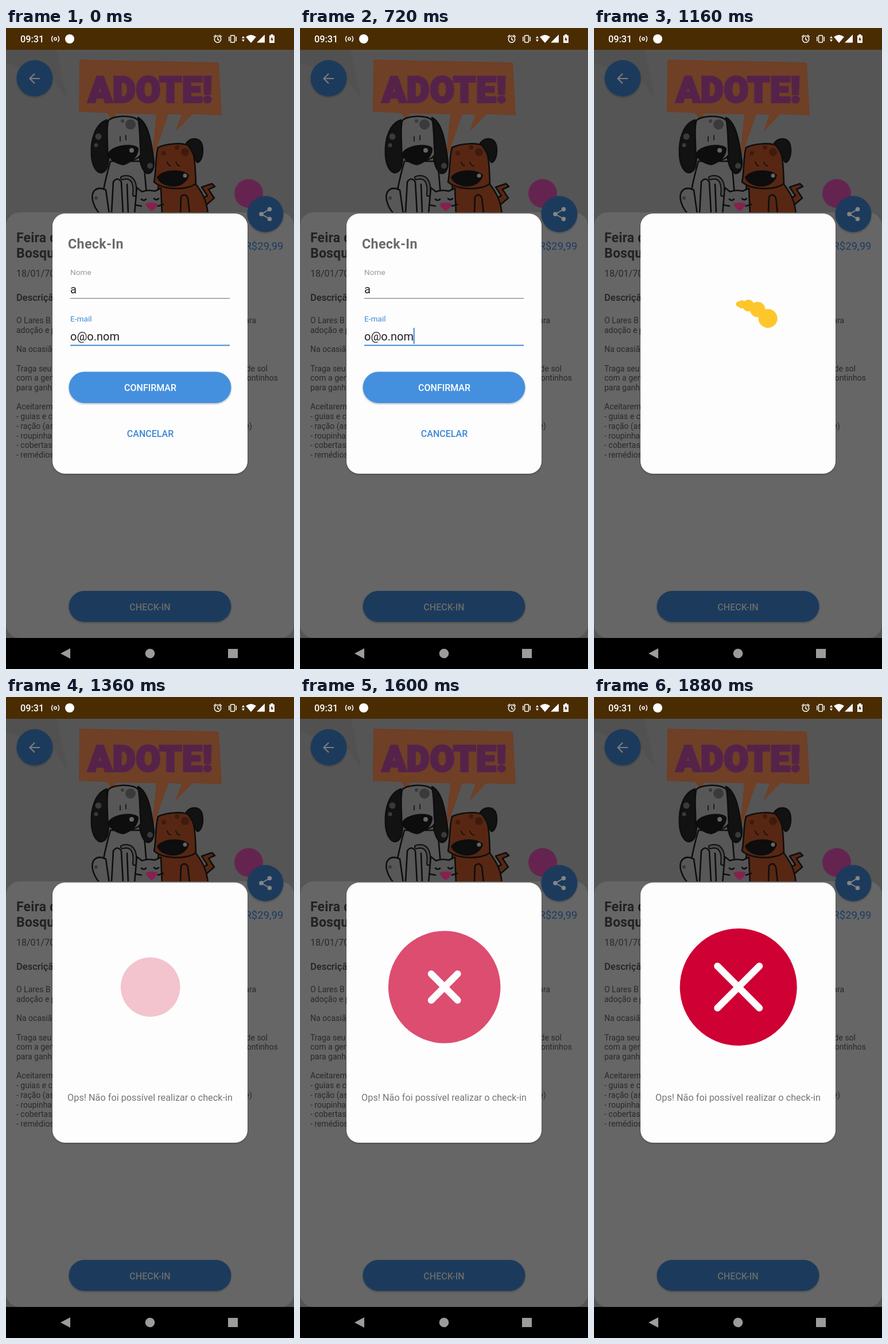
These frames come from a looping animation (502 px wide and 1116 px high, 3.2 s). An HTML page:

```html
<!DOCTYPE html>
<html lang="pt">
<head>
<meta charset="utf-8">
<title>Check-In</title>
<style>
  html, body { margin: 0; width: 100%; height: 100%; overflow: hidden; background: #000; }
  svg { display: block; width: 100%; height: 100%; font-family: Roboto, "Noto Sans", sans-serif; }
  .mid { text-anchor: middle; font-weight: 500; font-size: 16px; }
  .ink { stroke: #0e0e0e; stroke-width: 2.6; stroke-linejoin: round; stroke-linecap: round; }
  .line { fill: none; }
  .body { font-size: 14px; fill: #292929; }
</style>
</head>
<body>
<svg viewBox="0 0 502 1116">
  <defs>
    <filter id="soft" x="-20%" y="-20%" width="140%" height="150%">
      <feDropShadow dx="0" dy="1.5" stdDeviation="1.5" flood-opacity=".28"/>
    </filter>
    <clipPath id="photo"><rect y="38" width="502" height="284"/></clipPath>
  </defs>

  <!-- page -->
  <rect width="502" height="1062" fill="#555"/>
  <path d="M0 38H88L107 125L82 90L0 60Z" fill="#515151"/>

  <g clip-path="url(#photo)">
    <path d="M128 55L371 60L376 152L325 150L295 181L306 151L283 150L253 236L262 150L190 149L192 169L176 148L127 146Z" fill="#6f3f26"/>
    <text x="252" y="129" text-anchor="middle" font-size="61" font-weight="900" letter-spacing="1.2" fill="#552349" stroke="#552349" stroke-width="4">ADOTE!</text>

    <!-- white dog -->
    <g class="ink" fill="#575757">
      <path d="M182 232C174 260 167 290 164 324H248L240 232Z"/>
      <path d="M174 282C158 274 148 284 151 300C154 312 158 318 164 324H180Z"/>
      <path d="M176 160C158 166 147 190 149 222C150 240 158 252 166 252C176 250 178 240 179 224Z" fill="#121212"/>
      <path d="M230 156C246 164 252 190 257 226C260 244 254 254 246 253C238 250 234 236 231 216Z" fill="#121212"/>
      <path d="M178 162C184 152 224 150 231 162C234 180 233 196 235 220C228 236 184 236 177 220C178 200 174 180 178 162Z"/>
      <path class="line" d="M184 322L187 268Q194 258 201 268L204 322M213 322L211 272"/>
      <path class="line" d="M199 189V197M209 187V195" stroke-width="1.6"/>
    </g>
    <path d="M177 219C184 203 222 199 231 209C232 226 214 237 204 239C192 237 179 229 177 219Z" fill="#0d0d0d"/>
    <g fill="#3a3a3a">
      <circle cx="217" cy="168" r="9"/><circle cx="203" cy="162" r="3"/>
      <circle cx="161" cy="189" r="5.5"/><circle cx="157" cy="204" r="3.5"/>
      <circle cx="251" cy="240" r="5"/><circle cx="157" cy="296" r="3"/>
    </g>
    <circle cx="219" cy="213" r="4" fill="#666"/>

    <!-- brown dog -->
    <g class="ink" fill="#572713">
      <path d="M328 304L351 292L341 277L359 271L364 276L353 281L363 296L334 321Z"/>
      <path d="M266 270L262 324H352C350 300 342 286 328 268Z"/>
      <path d="M265 208C280 201 310 198 323 207C330 224 330 250 331 270C322 282 276 284 258 268C262 250 260 224 265 208Z"/>
      <path d="M314 201C322 190 338 190 342 204C345 220 340 232 334 234C328 230 328 214 314 201Z" fill="#121212"/>
      <path class="line" d="M304 322L305 294Q312 286 317 296L320 322"/>
      <path class="line" d="M281 233Q283 240 287 240M296 233Q299 241 303 240" stroke-width="1.6"/>
    </g>
    <path d="M263 260C272 245 308 244 319 256C316 270 302 277 289 276C276 275 266 269 263 260Z" fill="#0d0d0d"/>
    <circle cx="312" cy="257" r="3.5" fill="#666"/>
    <g fill="#401b0d">
      <circle cx="312" cy="216" r="7"/><circle cx="298" cy="208" r="4"/><circle cx="275" cy="218" r="4"/>
    </g>

    <!-- cat -->
    <path d="M203 261C222 256 226 272 224 290" fill="none" stroke="#0e0e0e" stroke-width="8" stroke-linecap="round"/>
    <path d="M203 261C222 256 226 272 224 290" fill="none" stroke="#4b4b4b" stroke-width="4" stroke-linecap="round"/>
    <path class="ink" d="M224 324L228 278L237 285Q248 281 259 284L270 279L272 324Z" fill="#555" stroke-width="2"/>
    <path class="line ink" d="M236 298Q240 302 244 298M258 297Q262 301 266 297M225 308L236 310M274 307L265 310" stroke-width="1.4"/>
    <path d="M243 306Q254 302 265 306Q262 314 254 319Q246 314 243 306Z" fill="#87204f"/>

    <circle cx="423" cy="288" r="25" fill="#652450"/>
  </g>

  <rect y="321" width="502" height="741" rx="24" fill="#666"/>
  <g filter="url(#soft)" fill="#1b3a5b">
    <circle cx="50" cy="87.5" r="31.5"/>
    <circle cx="452" cy="324" r="31.5"/>
    <rect x="109.5" y="980" width="283" height="54" rx="27"/>
  </g>
  <path d="M59 88H42M50 79.5L41.5 88L50 96.5" fill="none" stroke="#7c7c7c" stroke-width="2.2"/>
  <g fill="#858585" stroke="#858585" stroke-width="2">
    <path d="M459 316L445 324L459 332" fill="none"/>
    <circle cx="459.5" cy="315.5" r="2.8"/><circle cx="445" cy="324" r="2.8"/><circle cx="459.5" cy="332.5" r="2.8"/>
  </g>
  <text class="mid" x="251" y="1013.5" fill="#6b6b6b">CHECK-IN</text>

  <g fill="#222">
    <g font-size="23" font-weight="700" letter-spacing=".2"><text x="18" y="373">Feira de</text><text x="18" y="400">Bosque</text></g>
    <text x="18" y="433" font-size="16" fill="#292929">18/01/70</text>
    <text x="18" y="475" font-size="16.5" font-weight="500">Descrição</text>
  </g>
  <text x="483.5" y="386" font-size="18.5" text-anchor="end" fill="#1c3c62">R$29,99</text>
  <g id="copy" class="body"></g>

  <!-- system bars -->
  <rect width="502" height="38" fill="#4a2c03"/>
  <text x="25" y="25" font-size="16.3" font-weight="500" fill="#fff">09:31</text>
  <g fill="none" stroke="#fff" stroke-width="1.5">
    <circle cx="86" cy="19" r="2.2"/>
    <path d="M81.5 14Q77.5 19 81.5 24M90.5 14Q94.5 19 90.5 24"/>
    <circle cx="369" cy="19.5" r="5.7"/>
    <path d="M369 16V20L372 21.5M362 15.5L366 12M376 15.5L372 12"/>
    <rect x="391.5" y="13" width="7" height="12" rx="1"/>
    <path d="M388.8 15V23M401.2 15V23"/>
  </g>
  <g fill="#fff">
    <circle cx="111" cy="19" r="8"/>
    <path d="M411 18L413.5 14L416 18ZM411 20L413.5 24L416 20Z"/>
    <path d="M418 15.5Q427 8.5 436 15.5L427 26Z"/>
    <path d="M451 11.5V25.5H437Z"/>
    <path d="M459 13H461.5V11H465.5V13H468V26H459Z"/>
  </g>
  <path d="M464 15L461 20.5H463.2V24L466 18.8H464Z" fill="#4a2c03"/>
  <rect y="1062" width="502" height="54"/>
  <g fill="#9c9c9c">
    <path d="M112 1080V1098L95 1089Z"/><circle cx="251" cy="1089" r="8.3"/><rect x="387" y="1081" width="17" height="16"/>
  </g>

  <!-- dialog -->
  <rect x="81" y="323" width="340" height="453" rx="22" fill="#fdfdfd" filter="url(#soft)"/>

  <g id="form">
    <text x="108" y="384" font-size="23.3" font-weight="700" letter-spacing=".3" fill="#6b6b6b">Check-In</text>
    <text x="112" y="430" font-size="13.7" fill="#9b9b9b">Nome</text>
    <text x="112" y="462" font-size="20.3" fill="#222">a</text>
    <rect x="112" y="470" width="278" height="1.3" fill="#8b8680"/>
    <text x="112" y="511" font-size="13.7" fill="#4089d6">E-mail</text>
    <text x="112" y="544" font-size="20" fill="#222">o@o.nom</text>
    <rect x="112" y="551.5" width="278" height="2" fill="#4089d6"/>
    <rect id="caret" x="197.7" y="522" width="2" height="28" fill="#4089d6"/>
    <rect x="109.5" y="598.5" width="283" height="54.5" rx="27.2" fill="#4490de" filter="url(#soft)"/>
    <text class="mid" x="251.5" y="632" fill="#fff">CONFIRMAR</text>
    <text class="mid" x="251.5" y="712" fill="#3d86d3">CANCELAR</text>
  </g>

  <g id="loader" fill="#fdc62b"></g>

  <g id="error">
    <circle id="disc" cx="251.7" cy="505" fill="#cf0033"/>
    <path id="cross" fill="none" stroke="#fdfdfd" stroke-width="12" stroke-linecap="round"/>
    <text x="251" y="703" text-anchor="middle" font-size="16.25" fill="#757575">Ops! Não foi possível realizar o check-in</text>
  </g>
</svg>

<script>
const LOOP = 3200, STEP = 40;
const CARET_ON = 280, LOAD = 760, FAIL = 1240, CROSS = 1440;
const BALLS = [16.5, 13.3, 10.3, 7, 4.5];
const $ = id => document.getElementById(id);

function set(el, attrs) {
  for (const key in attrs) el.setAttribute(key, attrs[key]);
}
function add(parent, tag, attrs, text = '') {
  const el = document.createElementNS('http://www.w3.org/2000/svg', tag);
  set(el, attrs);
  el.textContent = text;
  return parent.appendChild(el);
}
const show = (el, on) => { el.style.display = on ? '' : 'none'; };
const clamp = x => Math.min(1, Math.max(0, x));
const easeOut = (x, power) => 1 - (1 - clamp(x)) ** power;
const easeBoth = x => x < 0.5 ? 2 * x * x : 1 - 2 * (1 - x) ** 2;

// Description: text left of the dialog, then what sticks out on its right.
const copy = [
  ['O Lares B', 'para', 436], ['adoção e p'], [''], ['Na ocasião'], [''],
  ['Traga seu', 'de sol', 456], ['com a gen', 'prontinhos', 474], ['para ganh'], [''],
  ['Aceitarem'], ['- guias e c'], ['- ração (as', 'te)', 429],
  ['- roupinha'], ['- cobertas'], ['- remédios']
];
copy.forEach(([left, right, end], i) => {
  const y = 514 + i * 16.72;
  add($('copy'), 'text', { x: 18, y }, left);
  if (right) add($('copy'), 'text', { x: end, y, 'text-anchor': 'end' }, right);
});

const balls = BALLS.map(r => add($('loader'), 'circle', { r }));

function draw(t) {
  show($('form'), t < LOAD);
  show($('caret'), t >= CARET_ON);
  show($('loader'), t >= LOAD && t < FAIL);
  show($('error'), t >= FAIL);

  balls.forEach((ball, i) => {
    const turn = easeBoth(clamp((t - LOAD - i * 90) / 1500));
    const angle = (turn - 0.25) * 2 * Math.PI;
    set(ball, { cx: 251.3 + 66.5 * Math.cos(angle), cy: 547.3 + 66.5 * Math.sin(angle) });
  });

  const grow = (t - FAIL) / 520;
  set($('disc'), { r: 102 * easeOut(grow, 2.7), opacity: clamp(grow) });
  const arm = 36.5 * easeOut((t - CROSS) / 440, 2.2);
  show($('cross'), t >= CROSS);
  set($('cross'), {
    d: `M${251.7 - arm} ${505 - arm}L${251.7 + arm} ${505 + arm}M${251.7 + arm} ${505 - arm}L${251.7 - arm} ${505 + arm}`
  });
}

const start = performance.now();
function tick() {
  const t = (performance.now() - start) % LOOP;
  draw(Math.floor(t / STEP) * STEP);
  requestAnimationFrame(tick);
}
tick();
</script>
</body>
</html>
```
